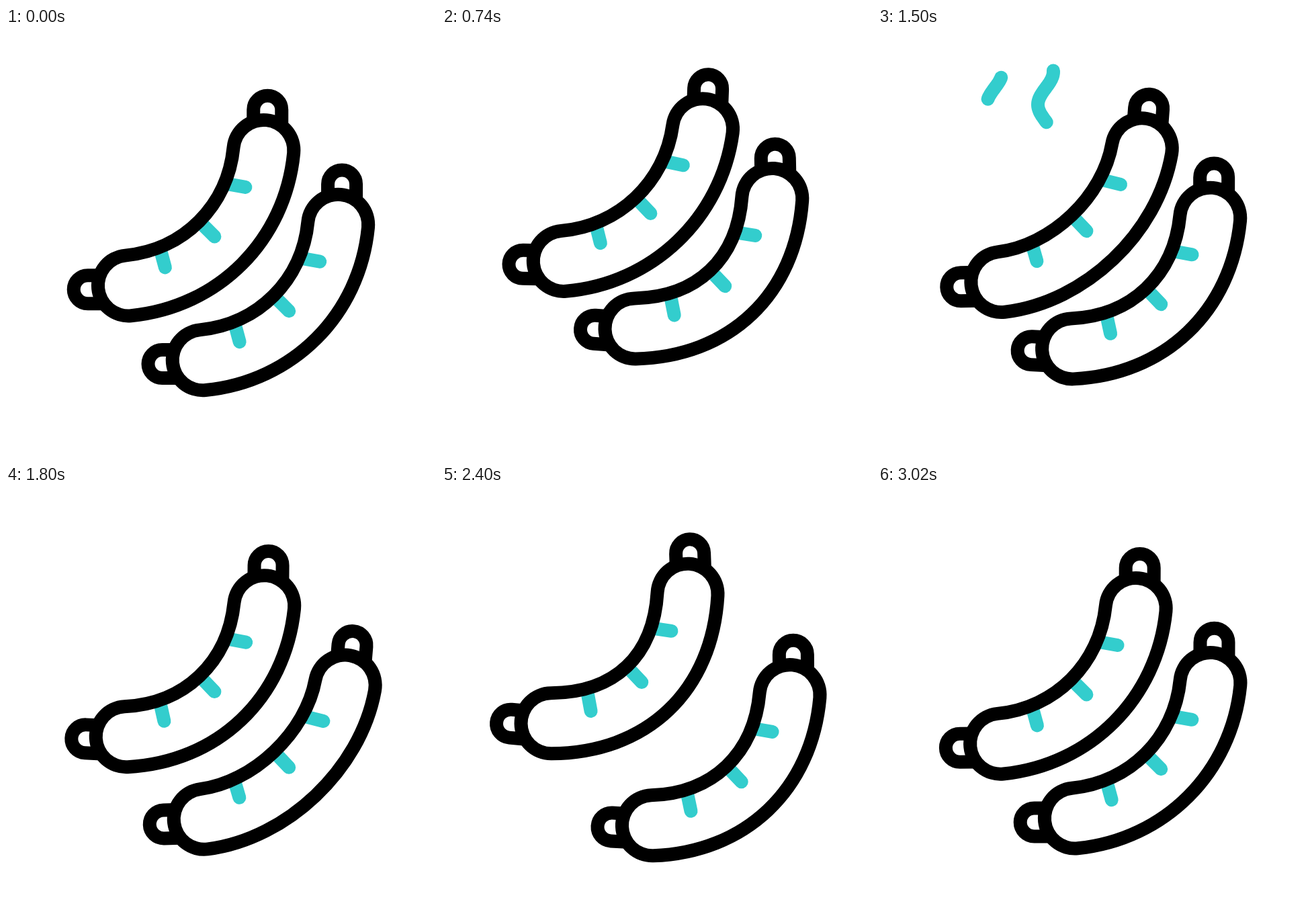
These frames come from a looping animation (640 px wide and 640 px high, 3.2 s). An HTML page with a canvas:

```html
<!DOCTYPE html>
<html lang="en">
<head>
<meta charset="utf-8">
<title>Sausages</title>
<style>
  html, body { margin: 0; width: 100%; height: 100%; overflow: hidden; background: #fff; }
  canvas { display: block; }
</style>
</head>
<body>
<canvas id="stage" width="640" height="640"></canvas>
<script>
const ctx = document.getElementById('stage').getContext('2d');
const LOOP = 3200, BEAT = 800, START = 140, END = 3020, CLAP = 2070;
const TEAL = '#33cdcd', REST = 51.6;

// near and far: diagonal shift when the pair claps together and springs apart
const sausages = [
  { home: 310.4, near: 13, far: -15, hopLag: 20, lag: 85, lagAfter: 0 },
  { home: 421.2, near: -63, far: 28, hopLag: 0, lag: 0, lagAfter: 85 }
];
const puffs = [{ x: 173.5, lag: 0 }, { x: 249.5, lag: 90 }];

const rad = deg => deg * Math.PI / 180;
const mix = (a, b, f) => a + (b - a) * f;
const wave = t => Math.cos(2 * Math.PI * t / BEAT);

// Smooth 0 to 1 between two times
function ease(t, from, to) {
  const x = Math.min(1, Math.max(0, (t - from) / (to - from)));
  return (1 - Math.cos(Math.PI * x)) / 2;
}

// Dip first, then jumps that die away
function hop(t) {
  const dip = 427, since = t - dip;
  if (since < 0) return 22 * ease(t, START, dip);
  const low = 22 - 0.0075 * since;
  const high = -39.5 * Math.exp((BEAT / 2 - since) / 800);
  return mix(high, low, (1 + wave(since)) / 2) * (1 - ease(t, 2500, END));
}

// The sausage that leads the wobble changes at the clap, when both bend alike
function bendAt(s, t) {
  const lag = t < 2046 ? s.lag : s.lagAfter;
  const bend = 43.5 - 17.5 * wave(Math.max(t - lag, START) - 404);
  return mix(bend, REST, ease(t, 2820, END));
}

function slideAt(s, t) {
  const apart = s.far * (1 - ease(t, 2330, 2640));
  return mix(s.near * ease(t, 1940, CLAP), apart, ease(t, CLAP, 2330));
}

function tiltAt(t) {
  return 45 - 1.5 * ease(t, START, 300) * (1 - ease(t, 2800, END));
}

function stroke(width, color) {
  ctx.lineWidth = width;
  ctx.strokeStyle = color;
  ctx.stroke();
}

function drawPuff(p, t) {
  const grow = ease(t - p.lag, 960, 1160), fade = ease(t - p.lag, 1300, 1620);
  const head = 76 * (1 - grow) + 24 * fade;
  const tail = 76 + 29 * grow ** 4 - 81 * fade;
  if (tail - head < 0.5) return;
  const top = mix(309, 52, ease(t, 900, 1560));
  ctx.beginPath();
  for (let q = head; ; q = Math.min(q + 2, tail)) {
    ctx.lineTo(p.x + 11.5 * Math.cos(2 * Math.PI * (q - 8) / 98), top + q);
    if (q >= tail) break;
  }
  stroke(20, TEAL);
}

function drawKnot(side, x, y, angle) {
  ctx.save();
  ctx.scale(side, 1);
  ctx.translate(x, y);
  ctx.rotate(-angle);
  ctx.translate(60.5, 0);
  ctx.rotate(rad(-5.5));
  ctx.beginPath();
  ctx.moveTo(-24, -21);
  ctx.lineTo(0, -21);
  ctx.arc(0, 0, 21, -Math.PI / 2, Math.PI / 2);
  ctx.lineTo(-24, 21);
  ctx.fillStyle = '#fff';
  ctx.fill();
  ctx.lineCap = 'butt';
  stroke(20, '#000');
  ctx.restore();
}

function drawMark(x, y, deg) {
  ctx.beginPath();
  ctx.moveTo(x, y);
  ctx.lineTo(x - 27 * Math.cos(rad(deg)), y - 27 * Math.sin(rad(deg)));
  stroke(20, TEAL);
}

function drawSausage(s, t) {
  const bend = bendAt(s, t), pos = s.home + slideAt(s, t);
  const half = (314 - 0.56 * bend) / 2, angle = rad(18.4 + 0.405 * bend);
  const endY = 12.7 - bend, rise = bend / 0.75;
  const inX = half - rise / Math.tan(angle), inY = endY + rise;

  ctx.save();
  ctx.translate(pos, pos + hop(t - s.hopLag));
  ctx.rotate(-rad(tiltAt(t)));
  for (const side of [-1, 1]) drawKnot(side, half, endY, angle);

  ctx.beginPath();
  ctx.moveTo(-half, endY);
  ctx.bezierCurveTo(-inX, inY, inX, inY, half, endY);
  stroke(110, '#000');
  stroke(70, '#fff');

  // Multiplying keeps the marks off the black outline
  ctx.globalCompositeOperation = 'multiply';
  const lean = 73 - 0.345 * bend, skew = (52 - bend) * 0.22;
  drawMark(84.5, -0.375 * bend + skew, lean);
  drawMark(0, 0, 90);
  drawMark(-84.5, -0.375 * bend - skew, 175 - lean);
  ctx.restore();
}

function frame(now) {
  const t = now % LOOP;
  ctx.fillStyle = '#fff';
  ctx.fillRect(0, 0, 640, 640);
  ctx.lineCap = 'round';
  ctx.lineJoin = 'round';
  for (const p of puffs) drawPuff(p, t);
  for (const s of sausages) drawSausage(s, t);
  requestAnimationFrame(frame);
}
requestAnimationFrame(frame);
</script>
</body>
</html>
```
